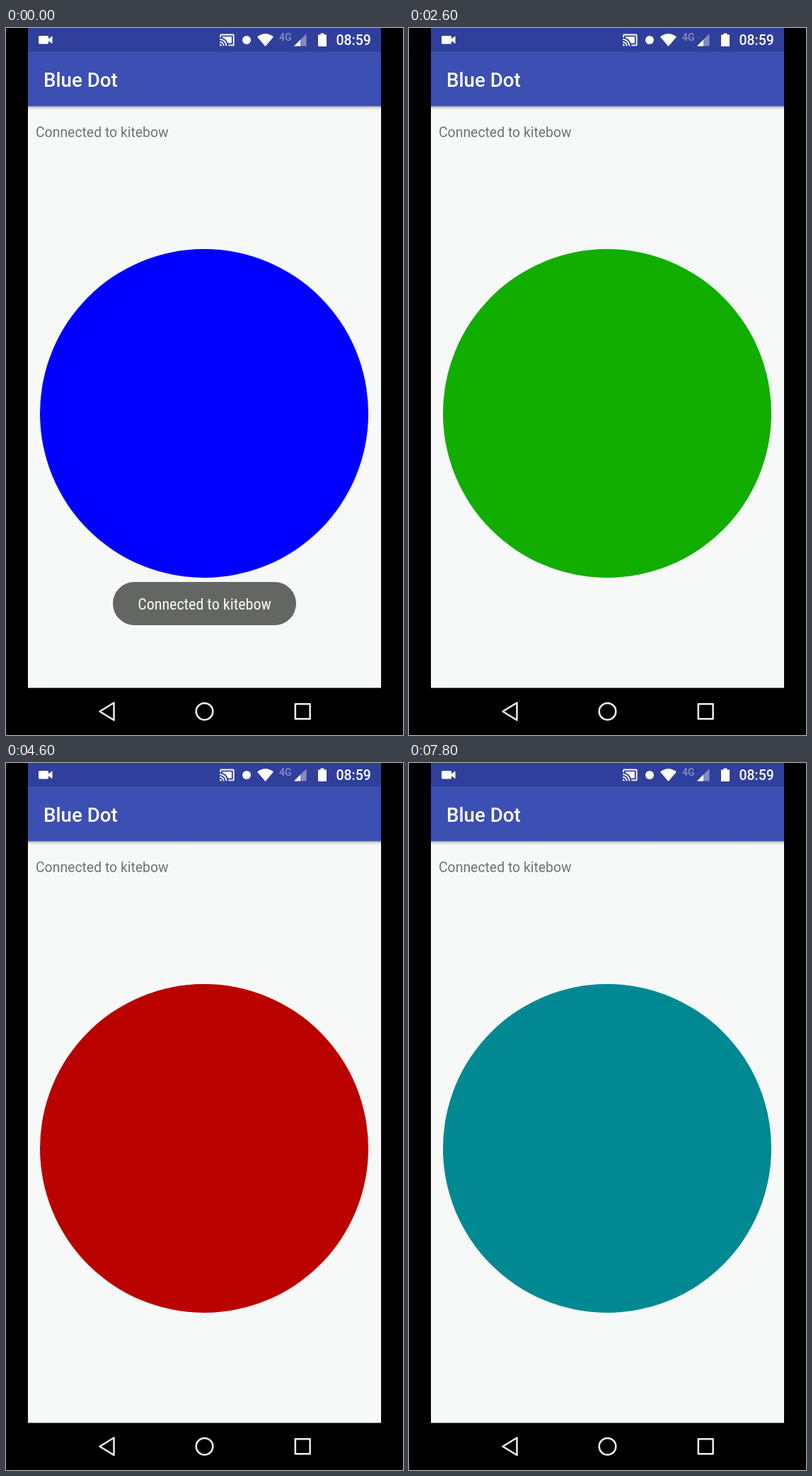
An HTML page for the animation above (8 s loop, 561 px wide and 998 px high).

```html
<!DOCTYPE html>
<html lang="en">
<head>
<meta charset="utf-8">
<title>Blue Dot</title>
<style>
  html, body { margin: 0; width: 100%; height: 100%; overflow: hidden; background: #000; }
  svg { display: block; width: 100%; height: 100%; }
  text { font-family: Roboto, "Noto Sans", sans-serif; }
  .medium { font-weight: 500; fill: #fff; }
  .toast { font-family: "Roboto Condensed", Roboto, sans-serif; font-stretch: condensed; }
</style>
</head>
<body>
<svg viewBox="0 0 561 998">
  <defs>
    <linearGradient id="shade" x2="0" y2="1">
      <stop offset="0" stop-opacity=".32"/>
      <stop offset=".4" stop-opacity=".1"/>
      <stop offset="1" stop-opacity="0"/>
    </linearGradient>
  </defs>

  <rect width="561" height="998"/>
  <rect x="31" width="499" height="931.5" fill="#f7f9f8"/>
  <rect x="31" y="110.5" width="499" height="6" fill="url(#shade)"/>
  <rect x="31" y="33" width="499" height="77.5" fill="#3c50b3"/>
  <rect x="31" width="499" height="33.5" fill="#303f9b"/>

  <!-- status bar -->
  <g fill="#fff">
    <path d="M47.500 11h11q1.500 0 1.500 1.500v2.700l5.500-4v11l-5.500-4v2.800q0 1.500-1.500 1.500h-11q-1.500 0-1.500-1.500v-8.500q0-1.500 1.500-1.500z"/>
    <g transform="translate(301.200 5.800) scale(.93)">
      <path d="M1 18v3h3c0-1.660-1.340-3-3-3zM5 7v1.630c3.960 1.280 7.090 4.410 8.370 8.370H19V7z"/>
      <path d="M1 15a6 6 0 0 1 6 6M1 11a10 10 0 0 1 10 10M2 8V5q0-1 1-1h18q1 0 1 1v14q0 1-1 1h-7" fill="none" stroke="#fff" stroke-width="2"/>
    </g>
    <circle cx="340" cy="17" r="6"/>
    <path d="M355 12.500Q366.500 3.500 378 12.500L366.500 26z"/>
    <path d="M424.500 8v17.500H407z" opacity=".4"/>
    <path d="M416 16.500v9h-9z"/>
    <path d="M441 9.500h3.500V7.500h5v2h3.500v16.500h-12z"/>
  </g>
  <text class="medium" x="386" y="18" font-size="14" opacity=".42">4G</text>
  <text class="medium" x="466.500" y="24" font-size="19.400">08:59</text>

  <text class="medium" x="53" y="83" font-size="27.700">Blue Dot</text>
  <text x="42" y="154" font-size="19.400" fill="#717372">Connected to kitebow</text>

  <circle id="dot" cx="280" cy="544" r="232"/>

  <g id="toast">
    <rect x="151" y="782" width="259" height="61" rx="30.500" fill="#646663"/>
    <text class="toast" x="280.500" y="820.500" font-size="22" fill="#f8f8f8" text-anchor="middle">Connected to kitebow</text>
  </g>

  <!-- navigation bar -->
  <g fill="none" stroke="#f0f0f0" stroke-width="2.500" stroke-linejoin="round">
    <path d="M132.500 964.800L152.500 952.500V977z"/>
    <circle cx="280.500" cy="964.700" r="11.800"/>
    <rect x="408.800" y="954.300" width="20.800" height="21"/>
  </g>
</svg>
<script>
  const LOOP = 8000, STEP = 200;
  const dot = document.getElementById("dot");
  const toast = document.getElementById("toast");

  // time, hue, brightness: a finger circling the dot
  const keys = [
    [800, 243, 205], [1800, 189.8, 195], [2600, 114.1, 174],
    [4000, 38.5, 170], [5400, -49.5, 206], [5800, -73, 208],
    [6000, -73, 208], [6600, -109.1, 210], [7800, -176.3, 146]
  ];

  function colorAt(t) {
    if (t < keys[0][0]) return [240, 255];
    const i = Math.max(1, keys.findIndex(k => k[0] >= t));
    const [a, b] = [keys[i - 1], keys[i]];
    const p = (t - a[0]) / (b[0] - a[0]);
    return [1, 2].map(n => a[n] + (b[n] - a[n]) * p);
  }

  function draw(now) {
    const t = Math.floor(now % LOOP / STEP) * STEP;
    const [hue, value] = colorAt(t);
    dot.setAttribute("fill", `hsl(${(hue + 360) % 360}, 100%, ${value / 5.1}%)`);
    const fade = Math.min(1, Math.max(0, (t - 1509) / 400));
    toast.setAttribute("opacity", 1 - fade * fade);
  }

  const start = performance.now();
  function tick() {
    draw(performance.now() - start);
    requestAnimationFrame(tick);
  }
  tick();
</script>
</body>
</html>
```
